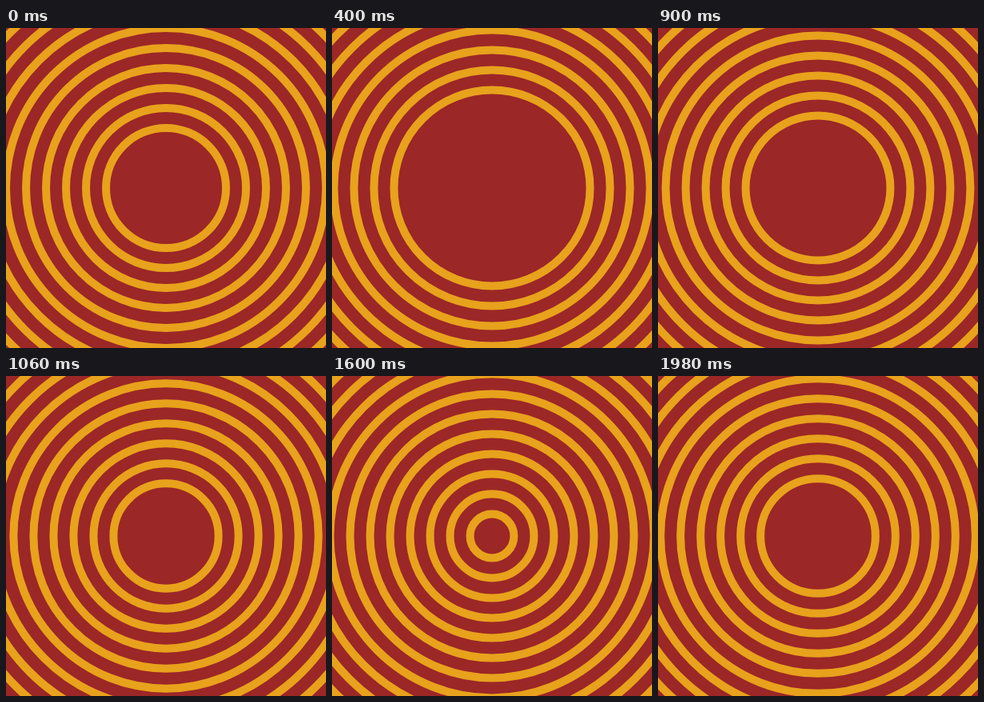
An HTML page with a canvas that plays this animation: 400 px wide and 400 px high, repeating every 2000 ms.

```html
<!DOCTYPE html>
<html lang="en">
<head>
<meta charset="utf-8">
<title>Pulsing rings</title>
<style>
  html, body { margin: 0; width: 100%; height: 100%; overflow: hidden; background: #9b2727; }
  canvas { display: block; }
</style>
</head>
<body>
<canvas id="stage" width="400" height="400"></canvas>
<script>
const ctx = document.getElementById('stage').getContext('2d');
const SIZE = 400, CENTER = SIZE / 2;
const LOOP = 2000, STEP = 20;
const GAP = 25, REACH = 290;

function draw(ms) {
  const t = Math.floor((ms % LOOP) / STEP) * STEP;
  const inner = 75 + 50 * Math.sin(2 * Math.PI * t / LOOP);
  ctx.fillStyle = '#9b2727';
  ctx.fillRect(0, 0, SIZE, SIZE);
  ctx.strokeStyle = '#e8a21c';
  ctx.lineWidth = 10;
  for (let r = inner; r < REACH; r += GAP) {
    ctx.beginPath();
    ctx.arc(CENTER, CENTER, r, 0, 2 * Math.PI);
    ctx.stroke();
  }
}

const start = performance.now();
function tick() {
  draw(performance.now() - start);
  requestAnimationFrame(tick);
}
tick();
</script>
</body>
</html>
```
